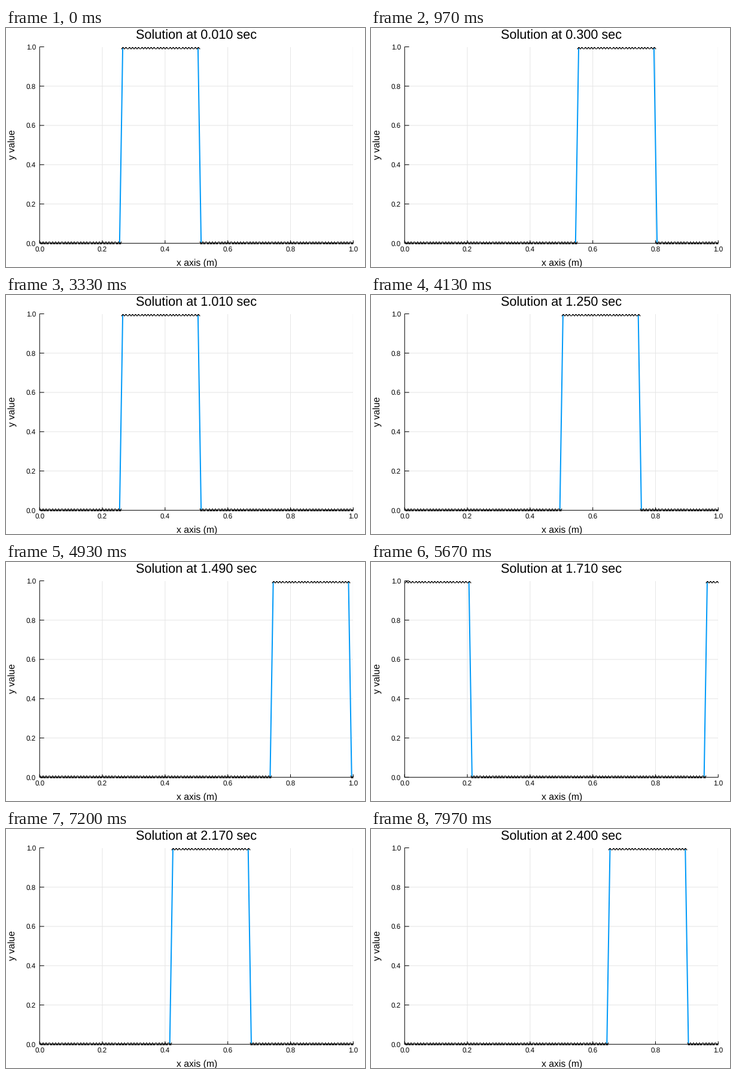
These frames come from a looping animation (600 by 400 pixels, 8 s). A matplotlib script:

```python
import numpy as np
import matplotlib.pyplot as plt
from matplotlib.animation import FuncAnimation
from matplotlib.patches import Rectangle
from matplotlib.path import Path

W, H, DPI = 600, 400, 100
PT = 72 / DPI                      # points per pixel
LEFT, RIGHT, TOP, BOTTOM = 56.2, 580.3, 31.5, 360.3
CELLS = 100
TICK_MS, LOOP_MS = 20, 8000

plt.rcParams.update({
    "font.family": "Liberation Sans",
    "text.hinting": "none",
})

# The axes cover the stage, so every coordinate is a pixel.
fig = plt.figure(figsize=(W / DPI, H / DPI), dpi=DPI, facecolor="white")
ax = fig.add_axes([0, 0, 1, 1])
ax.set(xlim=(0, W), ylim=(H, 0))
ax.axis("off")


def px(x):
    return LEFT + x * (RIGHT - LEFT)


def py(y):
    return BOTTOM + y * (TOP - BOTTOM)


def line(x, y, color, width=1, **kw):
    return ax.plot(x, y, color=color, linewidth=width * PT, snap=False,
                   solid_capstyle="butt", **kw)[0]


def label(x, y, text, size, ha="center", **kw):
    return ax.text(x, y, text, fontsize=size * PT, ha=ha, va="baseline", **kw)


def clip(artist, top, bottom):
    artist.set_clip_path(Rectangle((LEFT, top), RIGHT - LEFT, bottom - top,
                                   transform=ax.transData))


ticks = np.linspace(0, 1, 6)
for v in ticks:
    for grid in (line([px(v)] * 2, [TOP, BOTTOM], "#e6e6e6"),
                 line([LEFT, RIGHT], [py(v)] * 2, "#e6e6e6")):
        clip(grid, TOP, BOTTOM)
for v in ticks:
    line([px(v)] * 2, [BOTTOM, BOTTOM - 5], "black")
    line([LEFT, LEFT + 7.5], [py(v)] * 2, "black")
    label(px(v), 374.2, f"{v:.1f}", 11.6)
    label(50.2, py(v) + 4.3, f"{v:.1f}", 11.6, ha="right")
line([LEFT, LEFT, RIGHT], [TOP, BOTTOM, BOTTOM], "black")

label(319, 397.4, "x axis (m)", 15.8)
label(14.2, 195.5, "y value", 15.8, rotation=90, rotation_mode="anchor")
title = label(318, 18.9, "", 21.6)

x = (np.arange(CELLS) + 0.5) / CELLS
cross = Path([(-1, -1), (1, 1), (-1, 1), (1, -1)],
             [Path.MOVETO, Path.LINETO, Path.MOVETO, Path.LINETO])
wave = line([], [], "#009af9", 2, zorder=3)
marks = line([], [], "black", linestyle="none", marker=cross, zorder=4,
             markersize=5.6 * PT, markeredgewidth=1.2 * PT)
clip(wave, TOP + 1.5, BOTTOM - 1.5)
clip(marks, TOP, BOTTOM + 0.6)


def draw(i):
    step = (6 * i + 5) // 10 + 1   # 30 steps a second
    start = (np.arange(CELLS) - step) % CELLS
    y = py((start >= 25) & (start < 50))
    wave.set_data(px(x), y)
    marks.set_data(px(x), y)
    title.set_text(f"Solution at {step / 100:.3f} sec")
    return wave, marks, title


anim = FuncAnimation(fig, draw, frames=LOOP_MS // TICK_MS, interval=TICK_MS,
                     repeat=True, repeat_delay=0)
plt.show()
```
